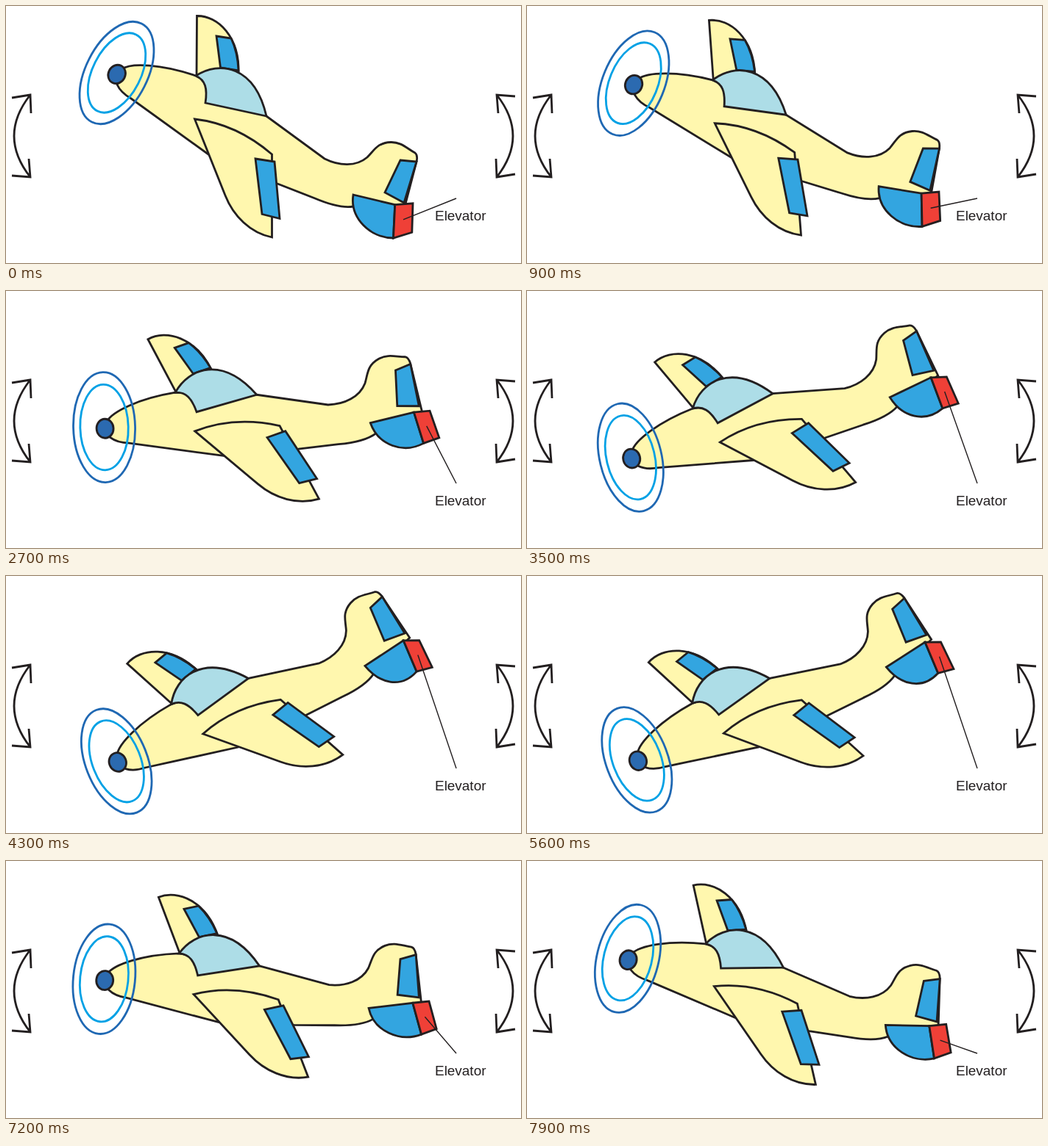
Write an HTML page that moves like this. It is 700x350 px and loops after 8000 ms.

```html
<!DOCTYPE html>
<html lang="en">
<head>
<meta charset="utf-8">
<title>Elevator and pitch</title>
<style>
html, body { margin: 0; width: 100%; height: 100%; overflow: hidden; background: #fff; }
svg { display: block; width: 700px; height: 350px; }
text { font: 18.95px "Liberation Sans", Arial, sans-serif; fill: #231f20; }
.ink { stroke: #231f20; stroke-width: 2.8; }
.body { fill: #fff7ae; }
.flap { fill: #33a5e0; }
.none { fill: none; }
</style>
</head>
<body>
<svg viewBox="0 0 700 350">
  <defs>
    <g id="arrow" class="ink none">
      <path d="M33 121Q-11 177 33 233M8 125L33 121 34 146M8 231L33 233 31 208"/>
    </g>
  </defs>
  <use href="#arrow"/>
  <use href="#arrow" transform="rotate(180 350 177)"/>

  <g id="plane" class="ink">
    <!-- far wing -->
    <path class="body" d="M259 96L259.500 13.500C288 13 318 42 316 92Z"/>
    <path class="flap" d="M286 41L306 44Q315 63 316 88L291.500 84Z"/>
    <!-- fuselage and fin -->
    <path class="body" d="M151 107L157 86C170 77 211 79 258 95L354 150L433 208C453 218 476 219 491 206C501 196 505 186 523 185.500C537 185 545 194 556 200Q560 203 558 212L541 277L472 273Q453 276 420 262L369 242L275 202L170 126Q156 118 151 107Z"/>
    <path class="flap" d="M536 210L558 212 541 268 515 254Z"/>
    <path fill="#addde7" d="M258 95C290 74 338 81 354 150L271 132C274 112 271 101 258 95Z"/>
    <!-- near wing -->
    <path class="body" d="M256.500 154L298 258C309 286 332 309 361.500 315L361.500 202C336 180 300 159 256.500 154Z"/>
    <path class="flap" d="M339 208L365 212 372 289.500 348 283.500Z"/>
    <!-- tailplane -->
    <path class="flap" id="stab"/>
    <path fill="#ef4037" id="elevator"/>
    <!-- propeller -->
    <g transform="translate(150.500 91) rotate(26.8)">
      <ellipse class="none" rx="42" ry="75" style="stroke:#1f68b3"/>
      <ellipse class="none" rx="32.700" ry="58.300" style="stroke:#00a1e5"/>
      <ellipse cx="1" cy="1.700" rx="11.500" ry="13" fill="#2b6ab0"/>
    </g>
  </g>

  <path id="leader" stroke="#231f20" stroke-width="1.4"/>
  <text x="583" y="292">Elevator</text>
</svg>
<script>
const $ = id => document.getElementById(id);
const LOOP = 8000, STEP = 100, CX = 330, CY = 172;

// time (s), pitch (deg), pitch rate (deg/s)
const keys = [
  [0, 0, -1.6], [0.9, -4.45, -8.2], [1.8, -14.6, -15], [3.5, -40.4, -15.1],
  [4.5, -49, -1.8], [4.8, -49.2, 0], [5.2, -49.2, 0], [5.6, -47.75, 8],
  [6.1, -40.2, 18], [6.5, -32.2, 18.5], [7.9, -12.8, 10]
];

// cubic Hermite interpolation between the keys
function pitch(t) {
  const i = keys.findIndex(k => k[0] >= t) || 1;
  const [t0, p0, v0] = keys[i - 1], [t1, p1, v1] = keys[i];
  const h = t1 - t0, u = (t - t0) / h, w = 1 - u;
  return w * w * (1 + 2 * u) * p0 + u * u * (3 - 2 * u) * p1
       + h * u * w * (w * v0 - u * v1);
}

function draw(t) {
  const angle = pitch(t), d = -angle, bend = Math.max(0, d - 20);

  // the elevator swings about its hinge as the nose drops
  const quad = [
    [528.7 + 0.08 * d, 270.7 + 0.05 * d],
    [553 - 0.0026 * d * d, 268.8 + 0.42 * d],
    [551.8 - 0.0088 * d * d, 308.3 + 0.38 * d],
    [526.5 - 0.48 * bend, 316 - 0.05 * bend]
  ];
  $("elevator").setAttribute("d", `M${quad.join("L")}Z`);
  const [hx, hy] = quad[0], [bx, by] = quad[3];
  $("stab").setAttribute("d", `M472 257L${hx} ${hy}L${bx} ${by}C${bx - 31} ${by} 467 289 472 257Z`);
  $("plane").setAttribute("transform", `rotate(${angle} ${CX} ${CY})`);

  const mean = k => quad.reduce((sum, p) => sum + p[k], 0) / 4;
  const x = mean(0) - CX, y = mean(1) - CY, a = angle * Math.PI / 180;
  const c = Math.cos(a), s = Math.sin(a);
  $("leader").setAttribute("d", `M612 262L${CX + x * c - y * s} ${CY + x * s + y * c}`);
}

function tick() {
  draw(Math.floor(performance.now() % LOOP / STEP) * STEP / 1000);
  requestAnimationFrame(tick);
}
tick();
</script>
</body>
</html>
```
